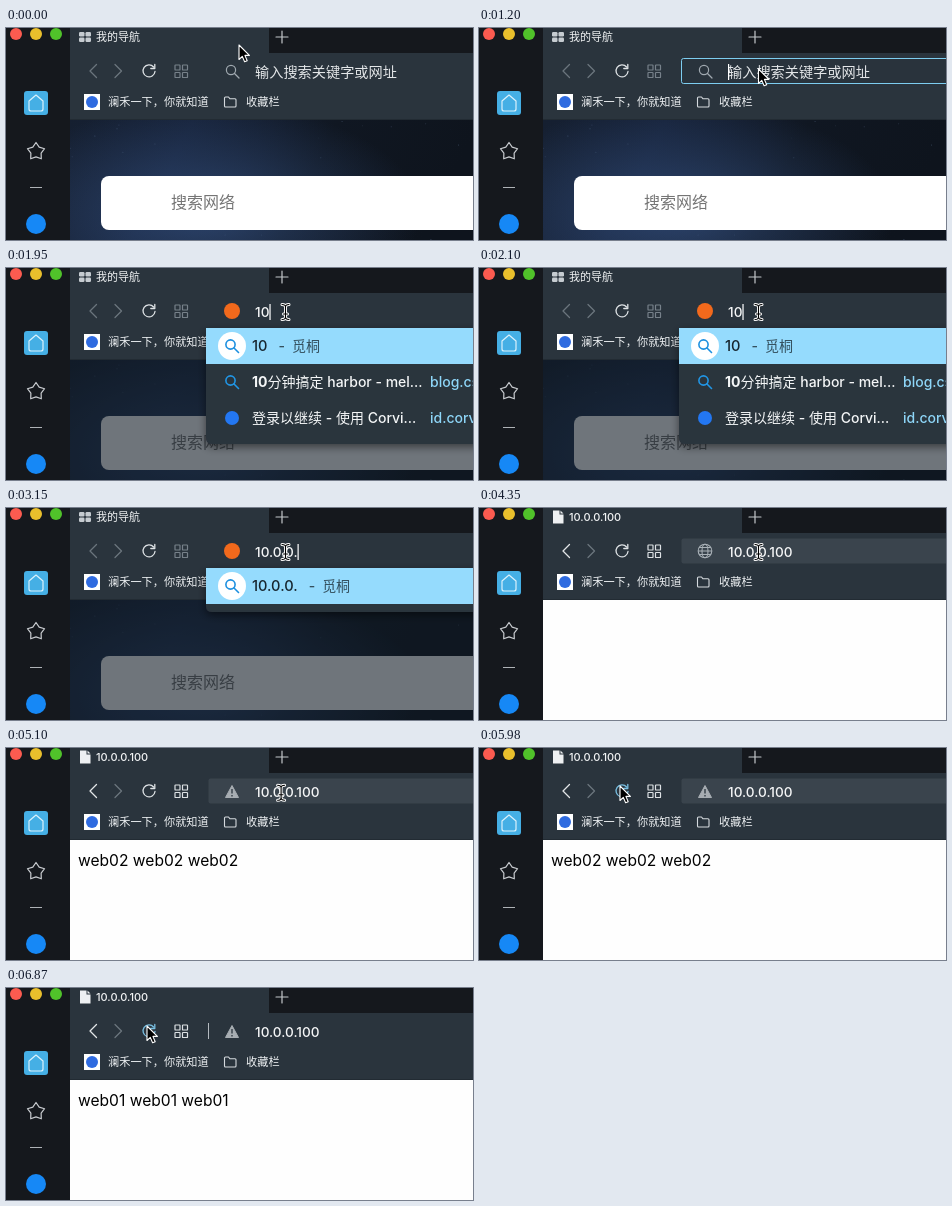
Recreate the animation shown at these times as an HTML page. Size 467 by 212 pixels, loop 8000 ms.

```html
<!DOCTYPE html>
<html lang="zh-CN">
<head>
<meta charset="utf-8">
<title>Browser</title>
<style>
  html, body { margin: 0; width: 100%; height: 100%; overflow: hidden; background: #15181d; }
  svg { display: block; width: 100%; height: 100%; }
  text { font-family: Inter, "Noto Sans CJK SC", "Noto Sans CJK", sans-serif; white-space: pre; }
  .line { fill: none; stroke-linecap: round; stroke-linejoin: round; }
  .row { font-size: 14px; font-weight: 500; }
  .typed { font-size: 14.6px; font-weight: 500; }
  .typed tspan { font-size: 14px; }
</style>
</head>
<body>
<svg viewBox="0 0 467 212" preserveAspectRatio="none">
  <defs>
    <linearGradient id="sky" x1="0" y1="0" x2="1" y2="0.15">
      <stop offset="0" stop-color="#151f30"/>
      <stop offset="0.3" stop-color="#17233a"/>
      <stop offset="0.65" stop-color="#101722"/>
      <stop offset="1" stop-color="#0e141d"/>
    </linearGradient>
    <radialGradient id="glow">
      <stop offset="0" stop-color="#345080" stop-opacity="0.75"/>
      <stop offset="0.5" stop-color="#304a76" stop-opacity="0.4"/>
      <stop offset="1" stop-color="#304a76" stop-opacity="0"/>
    </radialGradient>
    <filter id="shade" x="-10%" y="-20%" width="120%" height="150%">
      <feDropShadow dx="0" dy="3" stdDeviation="4.5" flood-color="#000" flood-opacity="0.5"/>
    </filter>
    <clipPath id="view"><rect x="64" y="92" width="403" height="120"/></clipPath>
    <g id="lens" class="line">
      <circle cx="-1.5" cy="-1.5" r="4.6"/>
      <path d="M2 2L6.5 6.5"/>
    </g>
  </defs>

  <!-- window frame -->
  <rect width="467" height="212" fill="#15181d"/>
  <path d="M64 0H263V25H467V92H64Z" fill="#2a343d"/>
  <rect x="64" y="91" width="403" height="1" fill="#222b33"/>
  <circle cx="10" cy="6" r="6" fill="#fb5b50"/>
  <circle cx="30" cy="6" r="6" fill="#e9bf2c"/>
  <circle cx="50" cy="6" r="6" fill="#50c22a"/>
  <path d="M270 9H282M276 3V15" class="line" stroke="#c3c7cb" stroke-width="1.2"/>

  <!-- sidebar -->
  <rect x="18" y="63" width="24" height="24" rx="3" fill="#45afe5"/>
  <path d="M30 67L37 73V81Q37 83 35 83H25Q23 83 23 81V73Z" class="line" stroke="#d9f1fc" stroke-width="1.2"/>
  <path id="star" class="line" stroke="#c9ccd0" stroke-width="1.2"/>
  <path d="M24 159.5H36" stroke="#aeb2b6"/>
  <circle cx="30" cy="196" r="10" fill="#1688f6"/>

  <!-- tab -->
  <g id="homeTab" fill="#c6ccd1">
    <rect x="73" y="4" width="5.5" height="4.5" rx="1.2"/>
    <rect x="79.5" y="4" width="5.5" height="4.5" rx="1.2"/>
    <rect x="73" y="9.5" width="5.5" height="4.5" rx="1.2"/>
    <rect x="79.5" y="9.5" width="5.5" height="4.5" rx="1.2"/>
  </g>
  <path id="pageTab" d="M74 2.5H80.5V6.5H84.5V15.5H74ZM81.5 2.5L84.5 5.5H81.5Z" fill="#eef0f2"/>
  <text id="title" x="90" y="13" font-size="11" font-weight="500" fill="#f2f4f5"></text>

  <!-- toolbar -->
  <g class="line" stroke-width="1.3">
    <path id="back" d="M90.5 36.5L84 43L90.5 49.5"/>
    <path d="M109 36.5L115.5 43L109 49.5" stroke="#6b757d"/>
    <g id="reload">
      <path d="M147.6 39A6 6 0 1 0 149 43.5"/>
      <path d="M148.8 36.5V40.5H144.8"/>
    </g>
    <g id="grid" stroke-width="1.2">
      <rect x="169" y="37" width="5" height="5" rx="0.6"/>
      <rect x="176.5" y="37" width="5" height="5" rx="0.6"/>
      <rect x="169" y="44.5" width="5" height="5" rx="0.6"/>
      <rect x="176.5" y="44.5" width="5" height="5" rx="0.6"/>
    </g>
  </g>
  <path id="divider" d="M202.5 35V51" stroke="#b4bac0"/>

  <!-- bookmarks -->
  <rect x="78" y="66" width="16" height="16" fill="#fff"/>
  <circle cx="86" cy="74" r="6" fill="#2f6be0"/>
  <g font-size="11.2" font-weight="500" fill="#eef1f3">
    <text x="102" y="78.2">澜禾一下，你就知道</text>
    <text x="240" y="78.2">收藏栏</text>
  </g>
  <path d="M218.5 70Q218.5 69 219.5 69H222.5L224 70.8H229Q230 70.8 230 71.8V78Q230 79 229 79H219.5Q218.5 79 218.5 78Z" class="line" stroke="#d5dade" stroke-width="1.1"/>

  <!-- page -->
  <g id="start" clip-path="url(#view)">
    <rect x="64" y="92" width="403" height="120" fill="url(#sky)"/>
    <ellipse cx="200" cy="185" rx="215" ry="110" fill="url(#glow)"/>
    <g id="stars" fill="#6e86ab"></g>
    <rect x="95" y="148" width="390" height="54" rx="8" fill="#fff"/>
    <text x="165" y="180" font-size="16" fill="#757575">搜索网络</text>
    <rect id="dim" x="64" y="92" width="403" height="120" fill="#101a24" opacity="0.6"/>
  </g>
  <g id="site">
    <rect x="64" y="92" width="403" height="120" fill="#fefefe"/>
    <text id="body" x="72" y="117.5" font-size="15.6" fill="#000"></text>
  </g>

  <!-- address field -->
  <rect id="field" x="202.5" y="30.5" width="280" height="25" rx="2"/>
  <g id="menu">
    <path id="panel" fill="#2b343c" filter="url(#shade)"/>
    <rect x="200" y="60" width="267" height="36" fill="#95dbfd"/>
    <circle cx="226" cy="78" r="14" fill="#fff"/>
    <use href="#lens" x="226" y="78" stroke="#1c8fdf" stroke-width="1.6"/>
    <text id="first" class="typed" y="83" fill="#17262f"></text>
    <g id="history" class="row" fill="#f4f6f7">
      <use href="#lens" x="226" y="114" stroke="#2196e6" stroke-width="1.6"/>
      <text x="246" y="119"><tspan font-weight="700">10</tspan>分钟搞定 harbor - mel...</text>
      <text x="424" y="119" fill="#8ed6f8">blog.cs</text>
      <circle cx="226" cy="150" r="7" fill="#2377f2"/>
      <text x="246" y="155">登录以继续 - 使用 Corvi...</text>
      <text x="424" y="155" fill="#8ed6f8">id.corvi</text>
    </g>
    <g id="search" class="typed">
      <use href="#lens" x="226" y="114" stroke="#2196e6" stroke-width="1.6"/>
      <text x="246" y="119" fill="#f4f6f7">10.0.0.100<tspan dx="11" fill="#98a3ab">-</tspan><tspan dx="7" fill="#98a3ab">觅桐</tspan></text>
    </g>
  </g>
  <use id="lensIcon" href="#lens" x="226.5" y="43.5" stroke="#a0a9b0" stroke-width="1.2"/>
  <circle id="engineIcon" cx="226" cy="43" r="8" fill="#f2691c"/>
  <g id="globeIcon" class="line" stroke="#a9b1b7" stroke-width="1.1">
    <circle cx="226" cy="43" r="6.8"/>
    <ellipse cx="226" cy="43" rx="3" ry="6.8"/>
    <path d="M219.5 43H232.5M220.5 39.5H231.5M220.5 46.5H231.5"/>
  </g>
  <g id="warnIcon">
    <path d="M226 37.5L232.5 49.5H219.5Z" fill="#a7adb2" stroke="#a7adb2" stroke-linejoin="round"/>
    <path d="M226 41V45.5M226 47V48.5" stroke="#333d46" stroke-width="1.4"/>
  </g>
  <text id="hint" x="249" y="49.2" font-size="14.2" fill="#e3e6e8">输入搜索关键字或网址</text>
  <text id="url" x="249" y="48.9" font-size="13.6" font-weight="500" fill="#f5f6f7"></text>
  <rect id="caret" y="36" width="1.2" height="16" fill="#fff"/>

  <!-- pointers -->
  <path id="arrow" d="M0 0V14.5L3.3 11.4L5.6 16.8L8.2 15.7L5.9 10.4H10.4Z" fill="#000" stroke="#fff" stroke-width="1.1" stroke-linejoin="round"/>
  <g id="beam" class="line">
    <path d="M-3.5 -7.5Q0 -7.5 0 -5Q0 -7.5 3.5 -7.5M0 -5V5M-3.5 7.5Q0 7.5 0 5Q0 7.5 3.5 7.5M-2 2H2" stroke="#fff" stroke-width="3"/>
    <path d="M-3.5 -7.5Q0 -7.5 0 -5Q0 -7.5 3.5 -7.5M0 -5V5M-3.5 7.5Q0 7.5 0 5Q0 7.5 3.5 7.5M-2 2H2" stroke="#000" stroke-width="1.1"/>
  </g>
</svg>
<script>
const LOOP = 8000, STEP = 150;
const FOCUS = 1200, MENU = 1800, MATCH = 3900, LEAVE = 4350, LOADED = 4500;
const RETURN = 5100, ARRIVE = 5980, REFRESH = 6870;
const ENGINE = '觅桐';
const KEYS = [
  [1650, '1'], [1950, '10'], [2250, '10.'], [2550, '10.0'], [2700, '10.0.'],
  [3000, '10.0.0'], [3150, '10.0.0.'], [3300, '10.0.0.1'], [3600, '10.0.0.10'], [3750, '10.0.0.100']
];

const el = id => document.getElementById(id);
const set = (id, attrs) => {
  for (const name in attrs) el(id).setAttribute(name, attrs[name]);
};
const show = (id, on) => set(id, { visibility: on ? 'inherit' : 'hidden' });
const write = (id, text) => {
  if (el(id).textContent !== text) el(id).textContent = text;
};
const mix = (a, b, k) => a + (b - a) * k;
const ease = k => k < 0.5 ? Math.pow(2 * k, 2.2) / 2 : 1 - Math.pow(2 - 2 * k, 2.2) / 2;

function buildStar() {
  const points = Array.from({ length: 10 }, (_, i) => {
    const r = i % 2 ? 5.4 : 9, a = i * Math.PI / 5 - Math.PI / 2;
    return `${30 + r * Math.cos(a)} ${123.5 + r * Math.sin(a)}`;
  });
  set('star', { d: `M${points.join('L')}Z` });
}

function buildSky() {
  let seed = 17;
  const rand = () => (seed = seed * 16807 % 2147483647) / 2147483647;
  let dots = '';
  for (let i = 0; i < 45; i++) {
    dots += `<circle cx="${64 + rand() * 403}" cy="${92 + rand() * 120}" r="0.5" opacity="${rand() * 0.5}"/>`;
  }
  el('stars').innerHTML = dots;
}

function pointerAt(t) {
  if (t < RETURN) {
    const k = ease(Math.min(7, Math.floor(t / STEP)) / 7);
    const beam = t >= FOCUS + STEP;
    return { x: mix(233, 279.5, k), y: beam ? 44 : mix(17, 41, k), beam };
  }
  const n = t >= ARRIVE ? 7 : Math.floor((t - RETURN) / STEP) + 1;
  const k = ease(n / 7), x = mix(279.5, 141, k);
  return { x, y: mix(44, 38, k) + 10 * Math.sin(Math.PI * k), beam: x > 202 };
}

function drawMenu(t, typed) {
  const open = t >= MENU && t < LEAVE;
  const history = t < 2250, match = t >= MATCH;
  const bottom = history ? 176 : match ? 140 : 104;
  show('menu', open);
  show('history', open && history);
  show('search', open && match);
  set('panel', { d: `M200 60H480V${bottom}H206Q200 ${bottom} 200 ${bottom - 6}Z` });
  set('first', { x: match ? 256 : 246 });
  const label = match ? typed + '/' : typed;
  if (el('first').dataset.label !== label + match) {
    el('first').dataset.label = label + match;
    el('first').innerHTML = match ? label
      : `${label}<tspan dx="11" fill="#34505e">-</tspan><tspan dx="7" fill="#34505e">${ENGINE}</tspan>`;
  }
}

function drawField(t, typed, pointer) {
  const ring = t >= FOCUS && t < MENU;
  const editing = t >= FOCUS && t < LEAVE;
  const hover = t < FOCUS ? pointer.y >= 31 : t >= LEAVE && t < REFRESH;
  set('field', {
    fill: hover ? '#3a444d' : ring ? '#29333c' : 'none',
    stroke: ring ? '#7dcdf0' : 'none'
  });
  show('lensIcon', !typed);
  show('engineIcon', typed && t < MATCH);
  show('globeIcon', t >= MATCH && t < LOADED);
  show('warnIcon', t >= LOADED);
  show('hint', !typed);
  write('url', typed);
  show('caret', editing);
  set('caret', { x: 249 + (typed ? el('url').getComputedTextLength() : 0) });
}

function draw(t) {
  const typed = KEYS.reduce((last, [at, text]) => t >= at ? text : last, '');
  const left = t >= LEAVE, loaded = t >= LOADED, pointer = pointerAt(t);

  show('homeTab', !left);
  show('pageTab', left);
  write('title', left ? '10.0.0.100' : '我的导航');
  set('back', { stroke: left ? '#e3e6e8' : '#6b757d' });
  set('grid', { stroke: left ? '#dde1e4' : '#77818a' });
  set('reload', { stroke: t >= ARRIVE ? '#79bfe2' : '#dfe3e6' });
  show('divider', t >= REFRESH);

  show('start', !left);
  show('dim', !left && t >= MENU);
  show('site', left);
  const host = t >= REFRESH ? 'web01' : 'web02';
  write('body', loaded ? `${host} ${host} ${host}` : '');

  drawField(t, typed, pointer);
  drawMenu(t, typed);

  const transform = `translate(${pointer.x} ${pointer.y})`;
  set('arrow', { transform });
  set('beam', { transform });
  show('arrow', !pointer.beam);
  show('beam', pointer.beam);
}

buildStar();
buildSky();
const begin = performance.now();
function tick() {
  draw((performance.now() - begin) % LOOP);
  requestAnimationFrame(tick);
}
tick();
</script>
</body>
</html>
```
